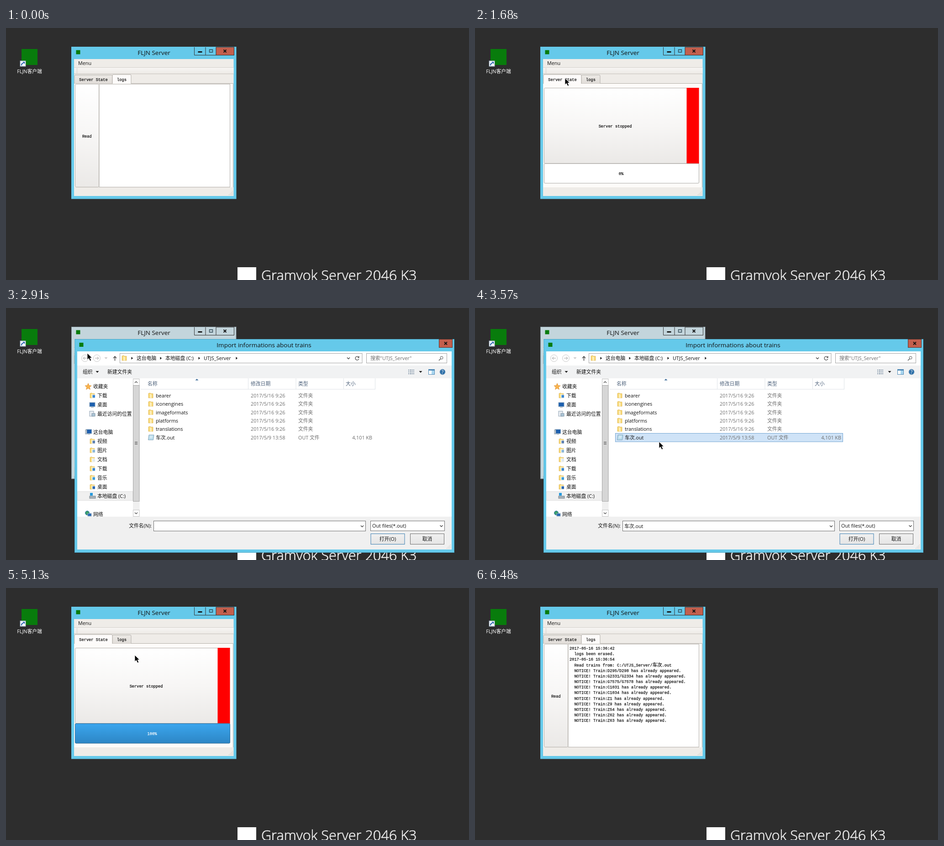
Recreate the animation shown at these times as an HTML page. Size 1014 by 552 pixels, loop 6720 ms.

```html
<!DOCTYPE html>
<html lang="en">
<head>
<meta charset="utf-8">
<title>Server log demo</title>
<style>
html, body { margin: 0; width: 100%; height: 100%; overflow: hidden; background: #2d2d2d; }
svg { display: block; width: 1014px; height: 552px; }
text { white-space: pre; font: 10.8px "Open Sans", "Noto Sans CJK SC", "Noto Sans CJK", sans-serif; }
.title { font-size: 13.5px; }
.mono { font: 8.67px "Liberation Mono", "Noto Sans CJK SC", monospace; stroke: currentColor; stroke-width: .25px; }
.brand { font-size: 30.6px; font-weight: 300; stroke: currentColor; stroke-width: .7px; }
.mid { text-anchor: middle; }
.end { text-anchor: end; }
</style>
</head>
<body>
<svg id="stage" viewBox="0 0 1014 552" xmlns="http://www.w3.org/2000/svg"></svg>
<script>
const LOOP = 6720, TICK = 30;
const BLUE = '#65c9ea', GREY = '#c3d5dc', RED = '#c35f4d', FACE = '#efece8', EDGE = '#b3afa9', GREEN = '#087c0c';

const rect = (x, y, w, h, fill, stroke = 'none', rx = 0) =>
  `<rect x="${x}" y="${y}" width="${w}" height="${h}" fill="${fill}" stroke="${stroke}" rx="${rx}"/>`;
const path = (d, stroke, width = 1, fill = 'none', dash = 'none') =>
  `<path d="${d}" stroke="${stroke}" stroke-width="${width}" fill="${fill}" stroke-dasharray="${dash}"/>`;
const circle = (x, y, r, fill, stroke = 'none') =>
  `<circle cx="${x}" cy="${y}" r="${r}" fill="${fill}" stroke="${stroke}"/>`;
const text = (x, y, s, cls = '', fill = '#111') =>
  `<text x="${x}" y="${y}" class="${cls}" fill="${fill}" color="${fill}">${s}</text>`;
const group = (id, body) => `<g id="${id}">${body}</g>`;
const grad = (id, ...colors) => `<linearGradient id="${id}" x2="0" y2="1">` +
  colors.map((c, i) => `<stop offset="${i / (colors.length - 1)}" stop-color="${c}"/>`).join('') + '</linearGradient>';
const down = (x, y, c = '#222') => path(`M${x - 3.5} ${y - 2}h7l-3.5 4z`, 'none', 0, c);
const right = (x, y) => path(`M${x - 1.5} ${y - 3}v6l3.5-3z`, 'none', 0, '#111');
const vee = (x, y) => path(`M${x - 3} ${y - 1.5}l3 3l3-3`, '#444', 1.4);
const cross = (x, y) => path(`M${x - 3} ${y - 3}l6 6m0-6l-6 6`, '#111', 1.8);
const grip = (x, y) => {
  let s = '';
  for (let i = 0; i < 4; i++) for (let j = 3 - i; j < 4; j++) s += rect(x + i * 2.6, y + j * 2.6, 1, 1, '#b9b5b0');
  return s;
};

function desktop() {
  return rect(0, 0, 1014, 552, '#2d2d2d') +
    rect(34, 46, 35, 35, GREEN) +
    rect(31, 72, 12, 12, '#f4f8fc', '#9ab') + path('M34 82c0-4 1-5 4-5', '#1c5ba8', 2) +
    path('M36.5 74h4.5v5z', 'none', 0, '#1c5ba8') +
    text(51.5, 99, 'FLJN客户端', 'mid', '#fff') +
    rect(507, 524, 41, 41, '#fff') +
    text(559, 553, 'Gramvok Server 2046 K3', 'brand', '#ececec');
}

function frame() {
  return `<rect id="border" x="143.5" y="41.5" width="360.5" height="332.5"/>` +
    rect(153.5, 48.5, 9, 9, GREEN) + text(324, 59, 'FLJN Server', 'title mid') +
    `<rect id="closeBtn" x="460" y="42" width="39.5" height="17.5" stroke="#333"/>` +
    path('M412.5 42v17.5H460M437 42v17.5', '#333') +
    rect(420.5, 51, 9, 2.8, '#111') + path('M445.5 47.5h7v5.5h-7z', '#2c4450', 1.3) + cross(479.5, 50.5) +
    rect(149, 68, 349.5, 300, FACE) + rect(149, 87, 349.5, 13, 'url(#bar)') +
    path('M149 86.5h349.5', '#d5d1cc') + path('M149 100.5h349.5', '#c6c2bc') +
    path('M154.5 88.5v10M156.5 88.5v10', '#bbb6b0', 1, 'none', '1 2') +
    text(158, 81, 'Menu') + grip(488, 357);
}

function tabs(logs) {
  const tab = (x, w, label, on) => {
    const top = on ? 104 : 105, foot = on ? 122 : 121.5;
    return path(`M${x} ${foot}V${top}q0-2 2-2h${w - 4}q2 0 2 2V${foot}`, EDGE, 1, on ? '#fdfbfa' : 'url(#tab)') +
      text(x + w / 2, on ? 115.5 : 116, label, 'mono mid');
  };
  const a = tab(150, 83, 'Server State', !logs), b = tab(233, 41, 'logs', logs);
  return rect(149.5, 121.5, 348, 227.5, '#fdfbf9') + path('M149.5 121.5h348V349', EDGE) + (logs ? a + b : b + a);
}

function logPage() {
  const seen = 'D295/D298 G2331/G2334 G7575/G7578 C1031 C1034 Z1 Z9 Z54 Z62 Z63'.split(' ')
    .map(n => `  NOTICE! Train:${n} has already appeared.`);
  const line = (s, i) => text(207, 135 + i * 12.18, s, 'mono');
  const first = ['2017-05-16 15:36:42', '  logs been erased.'];
  const rest = ['2017-05-16 15:36:54',
    '  Read trains from: C:/UTJS_Server/<tspan font-size="10.4">车次</tspan>.out', ...seen];
  return tabs(true) + rect(204, 123, 286.5, 225.5, '#fff', EDGE) +
    `<rect id="readBtn" x="151.5" y="123" width="52" height="225.5" rx="2" stroke="${EDGE}"/>` +
    group('readText', text(177.3, 239.5, 'Read', 'mono mid')) +
    group('firstLog', first.map(line).join('')) +
    group('restLog', rest.map((s, i) => line(s, i + 2)).join(''));
}

function statePage() {
  return tabs(false) + rect(151.5, 131.5, 313, 165, 'url(#btn)', EDGE, 2) +
    text(307, 218, 'Server stopped', 'mono mid') + rect(463.5, 131, 27, 166, '#f00') +
    rect(151.5, 297, 339, 43, '#fff', '#a9a7a4', 2) +
    `<rect id="chunk" x="151.5" y="297" height="43" rx="2" fill="url(#fill)" stroke="#2a6f9f"/>` +
    `<text id="percent" x="320" y="321.5" class="mono mid"></text>`;
}

function menu() {
  const items = ['Import trains', 'Import orders', 'Erase cache', 'Erase logs', 'Exit'];
  return rect(154.5, 68, 35.5, 18.5, '#3089c8', '#2878b0') + text(158, 81, 'Menu', '', '#fff') +
    rect(154.5, 87, 125, 108, '#fff', '#999') +
    items.map((s, i) => text(178, 102 + i * 21.7, s)).join('') +
    group('hot', rect(155, 87.5, 124, 21, '#2f8ccb', '#2371a8') + text(178, 102, items[0], '', '#fff'));
}

const folder = (x, y) => path(`M${x} ${y - 5}l4-1 1 1.5h5v9.5h-10z`, '#d9ae48', .6, '#f7d774') +
  path(`M${x + 3} ${y - 4}l4 1.5v8l-4-1z`, 'none', 0, '#fdeeb5');

function sidebar() {
  const item = (x, y, s) => text(x, y + 4, s);
  const lib = (y, s, c) => folder(184, y) + rect(189, y - 2, 6.5, 7, c, '#fff') + item(200, y, s);
  const screen = (x, y) => rect(x, y - 5, 12, 9, '#1c5fae', '#8fa8bd') + rect(x + 3, y + 5, 6, 1, '#8899a8');
  return path('M180 165l2 4.8 5 .4-4 3.2 1.3 5-4.3-2.7-4.3 2.7 1.3-5-4-3.2 5-.4z', '#d9892a', .8, '#fbb44c') +
    item(191, 172, '收藏夹') + lib(192, '下载', '#3b86d0') + screen(183, 212) + item(200, 212, '桌面') +
    rect(183, 226, 9, 11, '#e8edf2', '#93a5b5') + rect(188, 231, 7, 6, '#adc6d7', '#7f94a5') + item(200, 232, '最近访问的位置') +
    screen(175.5, 271) + rect(174, 267, 3, 9, '#cfd8df', '#8494a0') + item(191, 272, '这台电脑') +
    lib(292, '视频', '#5b7fb0') + lib(312, '图片', '#8ab6d8') + lib(332, '文档', '#dfe8ef') +
    lib(352, '下载', '#3b86d0') + lib(372, '音乐', '#3a9ad9') + lib(392, '桌面', '#2a66b0') +
    rect(157, 402, 121, 19.5, '#f0f0f0', '#dedede') + rect(183, 412, 13, 5, '#a8b2ba', '#7d8890') +
    rect(184, 405, 6, 6, '#2699dc') + item(200, 412, '本地磁盘 (C:)') +
    circle(178, 449, 4.5, '#3ca06a', '#2c6dac') + rect(179, 450, 8, 6, '#2569b5', '#9ab') + item(191, 452, '网络');
}

function fileList() {
  const head = [[310, '名称'], [536, '修改日期'], [640, '类型'], [744, '大小']];
  const row = (y, name, date, kind) => text(328, y, name) + text(536, y, date, '', '#6d6d6d') + text(640, y, kind, '', '#6d6d6d');
  return head.map(([x, s]) => text(x, 170, s, '', '#4c607a')).join('') +
    path('M530.5 154v24M635 154v24M739.5 154v24M808.5 154v24M295 178h514', '#dfe3e8') +
    path('M414.5 158.5h7l-3.5-3.5z', 'none', 0, '#3d6c99') +
    group('picked', rect(307.5, 274.5, 498, 18.5, '#cfe3f7', '#74a6d2')) +
    ['bearer', 'iconengines', 'imageformats', 'platforms', 'translations']
      .map((s, i) => folder(312, 192 + i * 18.3) + row(196 + i * 18.3, s, '2017/5/16 9:26', '文件夹')).join('') +
    path('M313 278h11l-1.5 11h-11z', '#7096ae', .8, '#b9dcec') + path('M315 281h6m-6.5 3h6', '#fff', 1) +
    row(287.5, '车次.out', '2017/5/9 13:58', 'OUT 文件') + text(802, 287.5, '4,101 KB', 'end', '#6d6d6d');
}

function dialog() {
  // dir 1 points left, -1 points right
  const nav = (x, dir) => circle(x, 110, 7.5, '#fff', '#c9c9c9') +
    path(`M${x + 4 * dir} 110h${-8 * dir}m${3.5 * dir} -3l${-3.5 * dir} 3l${3.5 * dir} 3`, '#c4c4c4', 1.4);
  const button = (x, s, c) => rect(x, 494.5, 74, 23, 'url(#btn2)', c) + text(x + 37, 510, s, 'mid');
  return rect(150.5, 68.5, 831, 467, BLUE, '#4aa5c4') + rect(160.5, 76, 9, 9, GREEN) +
    text(565, 86, 'Import informations about trains', 'title mid') +
    rect(948.5, 68.5, 29, 18, RED, '#5d332c') + cross(963, 77.5) +
    rect(156, 95, 820, 434, '#fff') + rect(156, 126, 820, 28, '#f1f2f3') +
    nav(173, 1) + nav(199, -1) + down(219, 110, '#ccc') +
    path('M238.5 115.5v-9m-3.5 3.5l3.5-4 3.5 4', '#555', 1.6) +
    rect(249.5, 99.5, 530.5, 21, '#fff', '#a3a3a3') + folder(254, 110) +
    [276, 339, 423, 505].map(x => right(x, 110)).join('') +
    text(286, 113.5, '这台电脑') + text(349, 113.5, '本地磁盘 (C:)') + text(433, 113.5, 'UTJS_Server') +
    vee(750, 110) + path('M772.5 108a4 4 0 1 0 .3 3.5m.2-6v3h-3', '#555', 1.3) +
    rect(789.5, 99.5, 176, 21, '#fff', '#a3a3a3') + text(798, 113.5, '搜索"UTJS_Server"', '', '#6d6d6d') +
    circle(954, 109, 3, 'none', '#555') + path('M952 111l-4 4', '#555', 1.5) +
    text(168, 144, '组织') + down(200, 140) + text(222, 144, '新建文件夹') +
    [136, 140, 144].map(y => path(`M881 ${y}h2m1.5 0h3.5m1 0h2m1 0h2`, '#5f7890', 1.6)).join('') + down(908, 140) +
    rect(925.5, 134.5, 13, 11, '#fff', '#4e88b5') + rect(932, 135, 6, 10, '#a9d6ef') + path('M925.5 136h13', '#4e88b5', 2) +
    circle(956, 140, 6, '#2d6fa8', '#87a9c4') + text(956, 144, '?', 'mid', '#fff') +
    sidebar() +
    rect(278, 154, 14.5, 303, '#f0f0f0') + rect(278.5, 155.5, 13.5, 14, '#fff', '#c5c5c5') + rect(278.5, 442.5, 13.5, 14, '#fff', '#c5c5c5') +
    path('M282 164l3-3 3 3M282 448l3 3 3-3', '#444', 1.2) + rect(278.5, 169.5, 13.5, 254, '#d6d6d6', '#a6a6a6') +
    path('M282 293.5h6m-6 2.5h6m-6 2.5h6', '#555') +
    fileList() +
    rect(156, 457, 820, 72, '#f0f0f0') + text(319, 481, '文件名(N):', 'end') +
    rect(323.5, 466.5, 464, 22, '#fff', '#707070') + group('fileName', text(327, 481.5, '车次.out')) + vee(780, 478) +
    rect(798.5, 466.5, 162, 21.5, '#fff', '#707070') + text(802, 481, 'Out files(*.out)') + vee(953.5, 477.5) +
    button(799, '打开(O)', '#3c7fb1') + button(885.5, '取消', '#707070') + grip(965, 518);
}

function message() {
  return rect(245.5, 155, 158, 107, BLUE, '#2d4c57') + rect(256.5, 163, 9, 9, GREEN) +
    text(323.5, 172.5, 'Good news', 'title mid') +
    rect(369.5, 155, 29, 18.5, RED, '#5d332c') + cross(384, 164) +
    rect(251.5, 181, 145.5, 74, FACE) + circle(275, 205, 13.2, '#1979ca') +
    circle(275, 198.3, 2, '#fff') + path('M272 203h4.5v8.5h1.8v1.5h-6.3v-1.5h1.8v-7h-1.8z', 'none', 0, '#fff') +
    text(305, 202, 'Import succeed.') + rect(318, 224, 69, 21.5, 'url(#btn)', '#3b7fae', 2) + text(352.5, 239, 'OK', 'mid');
}

const stage = document.getElementById('stage');
stage.innerHTML = '<defs>' + grad('bar', '#f7f5f3', '#edeae6') + grad('tab', '#ece9e5', '#e2deda') +
  grad('btn', '#fff', '#f7f6f5', '#ebe9e7') + grad('hover', '#fff', '#fbfaf9', '#f4f2f0') +
  grad('btn2', '#f0f0f0', '#e5e5e5') + grad('fill', '#3ba6ee', '#2d86c5') + '</defs>' +
  desktop() + frame() + group('logPage', logPage()) + group('statePage', statePage()) +
  group('menu', menu()) + group('dialog', dialog()) + group('message', message()) +
  group('cursor', path('M0 0V14.2L3.3 11.2 6 17 8.7 15.8 6.1 10.3H10.4z', '#fff', .8, '#000'));

const $ = id => document.getElementById(id);
const show = (id, on) => $(id).setAttribute('display', on ? 'inline' : 'none');
const set = (id, name, value) => $(id).setAttribute(name, value);

// Pointer stops: time, x, y
const STOPS = [
  [180, 907, 548], [720, 200, 212], [840, 185, 224], [1110, 185, 224], [1530, 197, 110],
  [1800, 197, 110], [2130, 182, 51], [2370, 171, 77], [2490, 171, 79], [2760, 177, 98],
  [2880, 177, 98], [3540, 403, 293], [3900, 403, 293], [4200, 402, 292], [4410, 375, 260],
  [4590, 353, 236], [4800, 353, 236], [5310, 253, 112], [5400, 253, 112], [5580, 197, 171],
  [5730, 197, 171], [6090, 434, 248], [6450, 818, 509]
];

function pointer(t) {
  const i = STOPS.findIndex(s => s[0] > t);
  if (i < 1) return STOPS[i ? STOPS.length - 1 : 0].slice(1);
  const [t0, x0, y0] = STOPS[i - 1], [t1, x1, y1] = STOPS[i];
  const u = (t - t0) / (t1 - t0), k = u * u * (3 - 2 * u);
  return [x0 + (x1 - x0) * k, y0 + (y1 - y0) * k];
}

function render(ms) {
  const t = Math.floor(ms % LOOP / TICK) * TICK;
  const within = (a, b) => t >= a && t < b;
  const [x, y] = pointer(t);
  show('cursor', within(180, 6480));
  set('cursor', 'transform', `translate(${Math.round(x)} ${Math.round(y)})`);

  const inactive = within(2880, 3750) || within(4080, 4770);
  set('border', 'fill', inactive ? GREY : BLUE);
  set('border', 'stroke', inactive ? '#8b9aa1' : BLUE);
  set('closeBtn', 'fill', inactive ? GREY : RED);

  const state = within(1680, 5370);
  show('statePage', state);
  show('logPage', !state);
  show('firstLog', t >= 900);
  show('restLog', t >= 5610);
  set('readText', 'transform', within(870, 900) || within(5580, 5610) ? 'translate(1 1)' : '');
  set('readBtn', 'fill', `url(#${t > 5400 && x < 204 && y > 122 ? 'hover' : 'btn'})`);

  const done = Math.round(100 * Math.min(1, Math.max(0, (t - 3900) / 150)));
  const ink = done > 50 ? '#fff' : '#111';
  show('chunk', done > 0);
  set('chunk', 'width', 3.39 * done);
  $('percent').textContent = done + '%';
  set('percent', 'fill', ink);
  set('percent', 'color', ink);

  show('menu', within(2400, 2850));
  show('hot', y > 87);

  show('dialog', within(2880, 3750));
  show('picked', t >= 3570);
  show('fileName', t >= 3570);
  show('message', within(4080, 4770));
}

const start = performance.now();
function tick() {
  render(performance.now() - start);
  requestAnimationFrame(tick);
}
tick();
</script>
</body>
</html>
```
